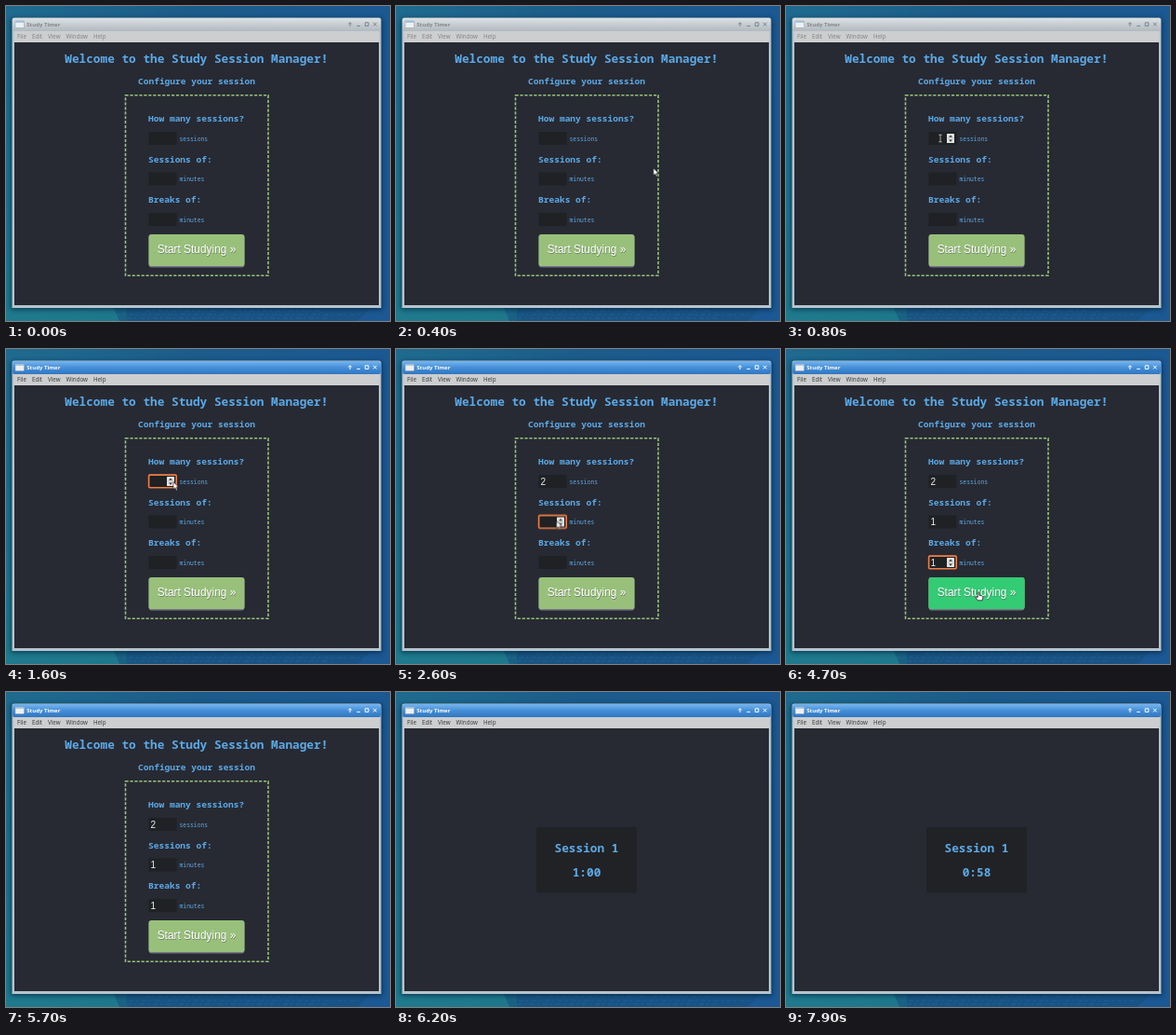
Write an HTML page that moves like this. It is 413x338 px and loops after 8 s.

```html
<!DOCTYPE html>
<html lang="en">
<head>
<meta charset="utf-8">
<title>Study Timer</title>
<style>
html, body { margin: 0; width: 100%; height: 100%; overflow: hidden; background: #1d5f8c; }
svg { display: block; width: 413px; height: 338px; }

.mono { font-family: "Noto Sans Mono", monospace; fill: #5ca9e6; }
.h1 { font-size: 12.75px; font-weight: 700; text-anchor: middle; }
.h2 { font-size: 9.56px; font-weight: 700; }
.unit { font-size: 6.38px; }
.ui { font-family: "Noto Sans", sans-serif; font-size: 6.2px; }
.title { font-size: 6px; font-weight: 700; }
.digit { font: 10px "Liberation Sans", Arial, sans-serif; fill: #eee; }
.label { font: 11.9px "Liberation Sans", Arial, sans-serif; fill: #fff; text-anchor: middle; }
.ring { fill: none; stroke: #ee8046; stroke-width: 1.6; }

/* 1.25% = 100 ms */
.t { animation: 8s step-end infinite; }
.active { animation-name: active; }
.form { animation-name: form; }
.timer { animation-name: timer; }
.focus1 { animation-name: focus1; }
.focus2 { animation-name: focus2; }
.focus3 { animation-name: focus3; }
.spin1 { animation-name: spin1; }
.spin2 { animation-name: spin2; }
.spin3 { animation-name: spin3; }
.one1 { animation-name: one1; }
.two1 { animation-name: two1; }
.one2 { animation-name: one2; }
.one3 { animation-name: one3; }
.caret { animation-name: caret; }
.hover { animation-name: hover; }
.s60 { animation-name: s60; }
.s59 { animation-name: s59; }
.s58 { animation-name: s58; }
.arrow { animation-name: arrow; }
.beam { animation-name: beam; }
.hand { animation-name: hand; }
.pointer { animation: move 8s linear infinite; }

@keyframes active { 0% { opacity: 0 } 12.5% { opacity: 1 } }
@keyframes form { 0% { opacity: 1 } 73.7% { opacity: 0 } }
@keyframes timer { 0% { opacity: 0 } 73.7% { opacity: 1 } }
@keyframes focus1 { 0% { opacity: 0 } 12.5% { opacity: 1 } 31.25% { opacity: 0 } }
@keyframes focus2 { 0% { opacity: 0 } 31.25% { opacity: 1 } 43.75% { opacity: 0 } }
@keyframes focus3 { 0% { opacity: 0 } 43.75% { opacity: 1 } 62.5% { opacity: 0 } }
@keyframes spin1 { 0% { opacity: 0 } 8.75% { opacity: 1 } 31.25% { opacity: 0 } }
@keyframes spin2 { 0% { opacity: 0 } 28.75% { opacity: 1 } 43.75% { opacity: 0 } }
@keyframes spin3 { 0% { opacity: 0 } 42.5% { opacity: 1 } 62.5% { opacity: 0 } }
@keyframes one1 { 0% { opacity: 0 } 21.25% { opacity: 1 } 23.75% { opacity: 0 } }
@keyframes two1 { 0% { opacity: 0 } 23.75% { opacity: 1 } }
@keyframes one2 { 0% { opacity: 0 } 36.25% { opacity: 1 } }
@keyframes one3 { 0% { opacity: 0 } 50% { opacity: 1 } }
@keyframes caret { 0% { opacity: 0 } 43.75% { opacity: 1 } 48.75% { opacity: 0 } }
@keyframes hover { 0% { opacity: 0 } 55% { opacity: 1 } 67.5% { opacity: 0 } }
@keyframes s60 { 0% { opacity: 1 } 86.2% { opacity: 0 } }
@keyframes s59 { 0% { opacity: 0 } 86.2% { opacity: 1 } 98.7% { opacity: 0 } }
@keyframes s58 { 0% { opacity: 0 } 98.7% { opacity: 1 } }
@keyframes arrow {
  0% { opacity: 0 } 1.25% { opacity: 1 } 8.75% { opacity: 0 }
  17.5% { opacity: 1 } 28.75% { opacity: 0 }
  32.5% { opacity: 1 } 42.5% { opacity: 0 }
  46.25% { opacity: 1 } 55% { opacity: 0 }
  67.5% { opacity: 1 } 71.1% { opacity: 0 }
}
@keyframes beam {
  0% { opacity: 0 } 8.75% { opacity: 1 } 17.5% { opacity: 0 }
  28.75% { opacity: 1 } 32.5% { opacity: 0 }
  42.5% { opacity: 1 } 46.25% { opacity: 0 }
}
@keyframes hand { 0% { opacity: 0 } 55% { opacity: 1 } 67.5% { opacity: 0 } }
@keyframes move {
  0% { transform: translate(420px, 215px) }
  8.75% { transform: translate(170px, 143px) }
  10%, 13.75% { transform: translate(166px, 142px) }
  18.75%, 25% { transform: translate(180px, 142.5px) }
  30%, 31.25% { transform: translate(166px, 185px) }
  33.75%, 37.5% { transform: translate(179px, 184px) }
  43.75%, 45% { transform: translate(161px, 231px) }
  48.75%, 51.25% { transform: translate(179px, 226px) }
  57.5%, 65% { transform: translate(207px, 261px) }
  71.25%, 100% { transform: translate(304px, 258px) }
}
</style>
</head>
<body>
<svg viewBox="0 0 413 338">
  <defs>
    <linearGradient id="desk" x2="1" y2=".25">
      <stop stop-color="#1f6b8e"/><stop offset=".45" stop-color="#1c5c8a"/><stop offset="1" stop-color="#1c5893"/>
    </linearGradient>
    <linearGradient id="teal" x2="0" y2="1">
      <stop stop-color="#1e86a0" stop-opacity="0"/><stop offset="1" stop-color="#1f828c"/>
    </linearGradient>
    <linearGradient id="grey" x2="0" y2="1">
      <stop stop-color="#dce1e4"/><stop offset="1" stop-color="#b0b9bf"/>
    </linearGradient>
    <linearGradient id="blue" x2="0" y2="1">
      <stop stop-color="#76b5ee"/><stop offset=".5" stop-color="#458fd8"/><stop offset="1" stop-color="#2f76c2"/>
    </linearGradient>
    <filter id="soft" x="-10%" y="-10%" width="120%" height="120%"><feGaussianBlur stdDeviation="2.5"/></filter>
    <filter id="blur" x="-10%" y="-30%" width="120%" height="160%"><feGaussianBlur stdDeviation=".6"/></filter>
    <g id="spinner">
      <rect x="173" y="137" width="8" height="10" rx=".6" fill="#e4e4e4"/>
      <path d="M173 142h8" stroke="#aaa" stroke-width=".5"/>
      <path d="M175 140.7l2-2.3 2 2.3zM175 143.4l2 2.3 2-2.3z" fill="#333"/>
    </g>
    <rect id="box" x="153.5" y="135" width="30" height="14" fill="#1f2124"/>
    <rect id="ring" class="ring" x="153.6" y="135.1" width="29.6" height="13.6" rx="1.2"/>
    <g id="buttons" fill="none" stroke-width="1">
      <path d="M370 22v-4M368.3 19.5l1.7-1.8 1.7 1.8M377.3 21.4h3.6M386.3 17.8h3.6v3.6h-3.6zM395 17.8l3.6 3.6M398.6 17.8l-3.6 3.6"/>
    </g>
    <g id="menu">
      <text x="12" y="35">File</text><text x="28" y="35">Edit</text><text x="45" y="35">View</text>
      <text x="64.5" y="35">Window</text><text x="94" y="35">Help</text>
    </g>
  </defs>

  <rect width="413" height="338" fill="url(#desk)"/>
  <rect width="130" height="338" fill="url(#teal)" opacity=".75"/>
  <path d="M116 324h276l-14 14H122z" fill="#164f7d" opacity=".55"/>
  <path d="M118 331h265M130 335h215M150 327h190" stroke="#2577a0" stroke-dasharray="5 3 2 4" opacity=".45"/>
  <rect x="5" y="13" width="400" height="313" rx="3" fill="#06243a" opacity=".65" filter="url(#soft)"/>

  <path d="M6.5 324V15q0-2.5 2.5-2.5h392q2.500 0 2.500 2.500v309z" fill="#b6c3cc"/>
  <rect x="7" y="13" width="396" height="14" rx="2" fill="url(#grey)"/>
  <rect x="8.500" y="27" width="393" height="12" fill="#cdcecf"/>
  <g class="ui" fill="#858585">
    <text class="title" x="22.300" y="22">Study Timer</text>
    <use href="#menu"/><use href="#buttons" stroke="#77838b"/>
  </g>
  <g class="ui t active">
    <rect x="7" y="13" width="396" height="14" rx="2" fill="url(#blue)"/>
    <rect x="8.500" y="27" width="393" height="12" fill="#cdcecf"/>
    <text class="title" x="22.300" y="22" fill="#fff">Study Timer</text>
    <use href="#menu" fill="#3c3c3c"/><use href="#buttons" stroke="#fff"/>
  </g>
  <rect x="10" y="16" width="9.500" height="7.500" rx=".7" fill="#edf0f2" stroke="#8f9ba5" stroke-width=".5"/>
  <rect x="10.300" y="16.300" width="8.900" height="1.400" fill="#8cb6da"/>
  <rect x="9" y="39" width="392" height="282" fill="#272a33"/>

  <g class="t form">
    <text class="mono h1" x="204.800" y="61">Welcome to the Study Session Manager!</text>
    <text class="mono h2" x="205" y="83.800" text-anchor="middle">Configure your session</text>
    <rect x="128.500" y="95.800" width="153.500" height="193.400" fill="none" stroke="#98c379" stroke-width="1.600" stroke-dasharray="3.200 1.750"/>

    <text class="mono h2" x="153" y="124.200">How many sessions?</text>
    <use href="#box"/>
    <text class="mono unit" x="186.500" y="144.700">sessions</text>
    <text class="digit t one1" x="155.500" y="145.500">1</text>
    <text class="digit t two1" x="155.500" y="145.500">2</text>
    <use class="t spin1" href="#spinner"/>
    <use class="t focus1" href="#ring"/>

    <g transform="translate(0 43.500)">
      <text class="mono h2" x="153" y="124.200">Sessions of:</text>
      <use href="#box"/>
      <text class="mono unit" x="186.500" y="144.700">minutes</text>
      <text class="digit t one2" x="155.500" y="145.500">1</text>
      <use class="t spin2" href="#spinner"/>
      <use class="t focus2" href="#ring"/>
    </g>

    <g transform="translate(0 87)">
      <text class="mono h2" x="153" y="124.200">Breaks of:</text>
      <use href="#box"/>
      <text class="mono unit" x="186.500" y="144.700">minutes</text>
      <text class="digit t one3" x="155.500" y="145.500">1</text>
      <path class="t caret" d="M156.500 138v8.500" stroke="#ddd" stroke-width=".6"/>
      <use class="t spin3" href="#spinner"/>
      <use class="t focus3" href="#ring"/>
    </g>

    <rect x="153.500" y="246" width="103" height="34.500" rx="3" fill="#777985" filter="url(#blur)"/>
    <rect x="153.500" y="245" width="103" height="34" rx="2.800" fill="#98c07a"/>
    <rect class="t hover" x="153.500" y="245" width="103" height="34" rx="2.800" fill="#34cb75"/>
    <text class="label" x="205.500" y="266" style="fill:#666" opacity=".7" filter="url(#blur)">Start Studying »</text>
    <text class="label" x="205" y="265.400">Start Studying »</text>
  </g>

  <g class="t timer">
    <rect x="151" y="145" width="108" height="70.500" fill="#212225"/>
    <g class="mono h1">
      <text x="205" y="172">Session 1</text>
      <text class="t s60" x="205" y="197.700">1:00</text>
      <text class="t s59" x="205" y="197.700">0:59</text>
      <text class="t s58" x="205" y="197.700">0:58</text>
    </g>
  </g>

  <g class="pointer">
    <path class="t arrow" d="M0 0v8l1.900-1.700 1.300 2.900 1.300-.6-1.300-2.800h2.500z" fill="#fff" stroke="#111" stroke-width=".6"/>
    <g class="t beam" fill="none">
      <path d="M-1.700-3.800h3.400M0-3.800v7.600M-1.700 3.800h3.400" stroke="#111" stroke-width="1.500"/>
      <path d="M-1.700-3.800h3.400M0-3.800v7.600M-1.700 3.800h3.400" stroke="#ddd" stroke-width=".8"/>
    </g>
    <path class="t hand" d="M-.8.300q.8-1 1.600 0v3l3.200.7q1 .4.800 1.600l-.6 3.200H-.8l-2.200-3q-.2-1.200 1-1l1.200 1z" fill="#fff" stroke="#111" stroke-width=".7"/>
  </g>
</svg>
</body>
</html>
```
